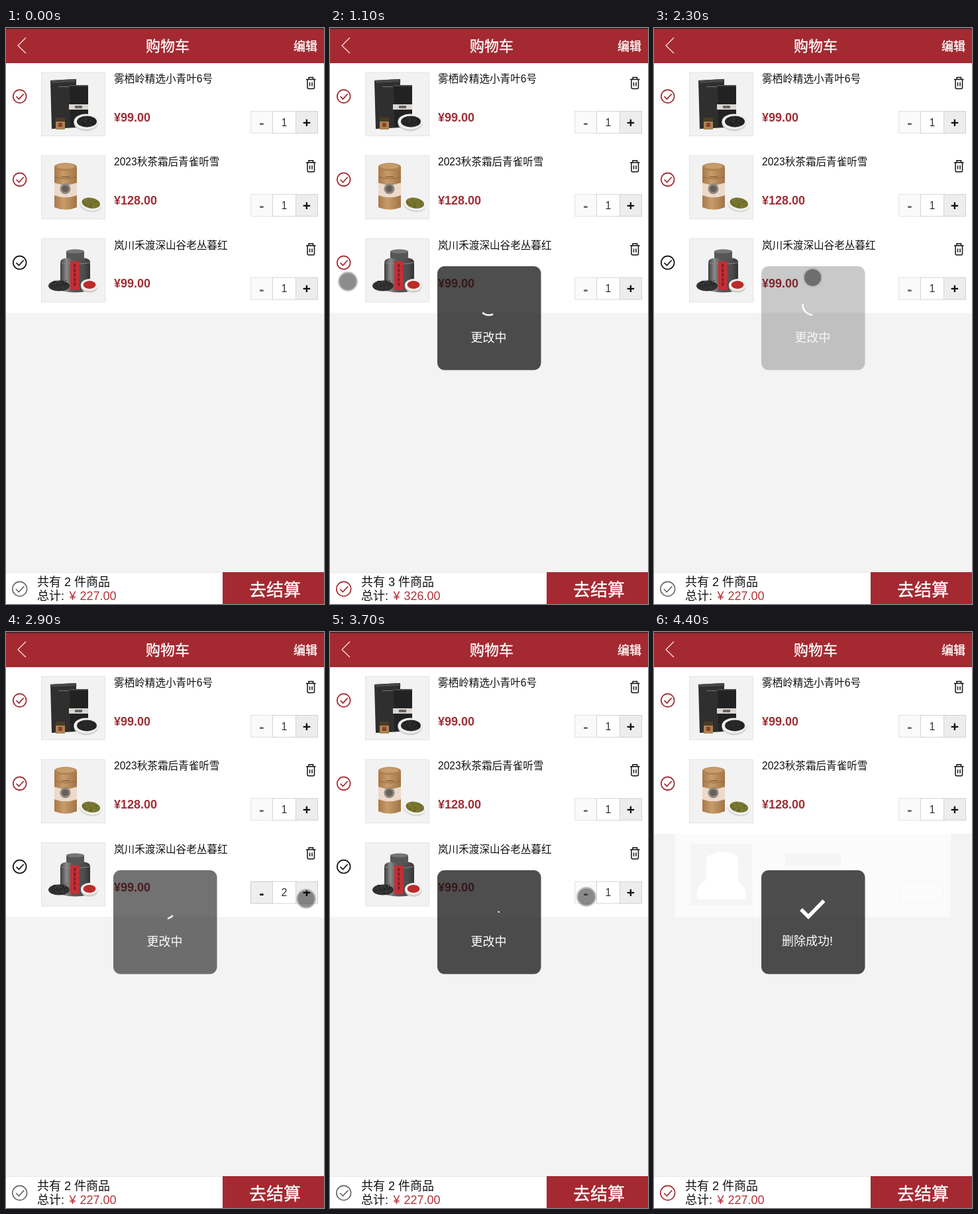
Recreate the animation shown at these times as an HTML page. Size 480 px wide and 868 px high, loop 4.5 s.

```html
<!DOCTYPE html>
<html lang="zh-CN">
<head>
<meta charset="utf-8">
<title>购物车</title>
<style>
  html, body { margin: 0; width: 100%; height: 100%; overflow: hidden; background: #f3f3f3; }
  svg { display: block; width: 480px; height: 868px; font-family: "Liberation Sans", "Noto Sans CJK SC", "Noto Sans CJK", sans-serif; }
</style>
</head>
<body>
<svg viewBox="0 0 480 868">
  <defs>
    <linearGradient id="tin">
      <stop offset="0" stop-color="#3a3a3a"/><stop offset=".2" stop-color="#8a8a8a"/>
      <stop offset=".4" stop-color="#5a5a5a"/><stop offset=".8" stop-color="#4c4c4c"/>
      <stop offset="1" stop-color="#333"/>
    </linearGradient>
    <linearGradient id="can">
      <stop offset="0" stop-color="#a97848"/><stop offset=".4" stop-color="#c89c6a"/>
      <stop offset="1" stop-color="#a27446"/>
    </linearGradient>
  </defs>
  <g id="stage"></g>
</svg>
<script>
const LOOP = 4500, STEP = 100, PITCH = 125.3, RED = '#a42931';
const stage = document.getElementById('stage');

const rect = (x, y, w, h, fill, more = '') =>
  `<rect x="${x}" y="${y}" width="${w}" height="${h}" fill="${fill}" ${more}/>`;
const oval = (x, y, rx, ry, fill, more = '') =>
  `<ellipse cx="${x}" cy="${y}" rx="${rx}" ry="${ry}" fill="${fill}" ${more}/>`;
const line = (d, color, width, more = '') =>
  `<path d="${d}" fill="none" stroke="${color}" stroke-width="${width}" ${more}/>`;
const text = (x, y, size, fill, str, more = '') =>
  `<text x="${x}" y="${y}" font-size="${size}" fill="${fill}" ${more}>${str}</text>`;
const MID = 'text-anchor="middle"', BOLD = 'font-weight="bold"';
const FIRM = 'stroke="#fff" stroke-width=".35"';

const tick = (x, y, r, color, width) =>
  `<circle cx="${x}" cy="${y}" r="${r}" fill="none" stroke="${color}" stroke-width="${width}"/>` +
  line(`M${x - r * .52} ${y + r * .02}l${r * .4} ${r * .4}l${r * .72} ${-r * .78}`, color, width);

// Loose tea: short seeded strokes inside an ellipse
function leaves(x, y, rx, ry, colors, seed) {
  const rnd = () => (seed = seed * 16807 % 2147483647) / 2147483647;
  let out = '';
  for (let i = 0; i < 36; i++) {
    const a = rnd() * 6.283, d = Math.sqrt(rnd());
    out += line(`M${(x + rx * d * Math.cos(a)).toFixed(1)} ${(y + ry * d * Math.sin(a)).toFixed(1)}` +
      `l${(rnd() * 5 - 2.5).toFixed(1)} ${(rnd() * 3 - 1.5).toFixed(1)}`, colors[i % colors.length], 1.3);
  }
  return out;
}

const boxes =
  '<path d="M67 79L106 77V150L69 152Z" fill="#2f2f2f"/>' +
  '<path d="M67 79L102 77L107 81L70 83Z" fill="#484848"/>' + rect(79, 88, 16, 1, '#777') +
  '<path d="M96 87H124V147L97 149Z" fill="#222"/>' + rect(96, 86, 28, 2, '#484848') +
  rect(95, 115, 29, 8, '#d9d6d2') + rect(104, 117, 11, 4, '#6b6460') +
  rect(75, 135, 14, 18, '#a98555') + rect(75, 135, 14, 6, '#4b3c28') + rect(79, 143, 6, 6, '#8f3d2c') +
  oval(121, 143, 18.5, 12.5, '#d2d2d2') + oval(121, 141, 18.5, 11.5, '#efefef') +
  oval(122, 141, 15, 8.5, '#262626') + leaves(122, 141, 13, 7, ['#111', '#444', '#2a2a2a'], 7);

const canister =
  '<path d="M73 84V145Q90 152 107 145V84Z" fill="url(#can)"/>' +
  '<path d="M73 108Q90 114 107 108V127Q90 133 73 127Z" fill="#ecd9ca"/>' +
  oval(90, 84, 17, 6, '#b08050') + oval(90, 83, 14, 4, '#c79c6c') +
  line('M73 99Q90 105 107 99', '#8f673f', 1) + line('M84 99h12', '#7a5836', 1.2) +
  oval(89.5, 117, 8, 8, '#8d8780') + oval(89.5, 117, 5, 5, '#655f58') +
  '<g transform="rotate(10 128 140)">' + oval(128, 141, 17, 11, '#d6d6d6') + oval(128, 139, 17, 10.5, '#f4f4f4') +
  oval(128, 138.5, 14, 8, '#77752f') + leaves(128, 138.5, 12, 6.5, ['#59611f', '#8d8a42', '#6b5a25'], 21) + '</g>';

const tin =
  '<path d="M82 102Q83 97 92 96H118Q126 97 127 102V145Q104 151 82 145Z" fill="url(#tin)"/>' +
  '<path d="M91 86Q105 81 118 86V96Q105 100 91 96Z" fill="#565656"/>' +
  oval(104.5, 86, 13.5, 3, '#757575') + line('M82 103Q104 107 127 103', '#8a8a8a', 1) +
  rect(97, 101, 13.5, 43, '#c42f35') + line('M103.7 105V140', '#7d1f24', 3, 'stroke-dasharray="5 2"') +
  oval(80, 138, 16, 8, '#303030') + leaves(80, 136, 14, 8, ['#151515', '#4a4a4a', '#2b2725'], 33) +
  oval(126, 138.5, 13, 10, '#d2cdc9') + oval(126, 136.5, 13, 9, '#f2eeeb') + oval(126, 136.5, 9.5, 6, '#bd2b2b');

const items = [
  { name: '雾栖岭精选小青叶6号', price: '99.00', art: boxes },
  { name: '2023秋茶霜后青雀听雪', price: '128.00', art: canister },
  { name: '岚川禾渡深山谷老丛暮红', price: '99.00', art: tin }
];

const bin = line('M453 77.5H467.5M457 77V74.5H463.5V77M455 78V89.5Q455 91.5 457 91.5H463.5Q465.5 91.5 465.5 89.5V78M458.5 82V87.5M462 82V87.5', '#111', 1.5);

function row(item, index, checked, count) {
  const less = count > 1;
  return `<g transform="translate(0 ${index * PITCH})">` +
    rect(0, 53, 480, PITCH + .4, '#fff') +
    tick(20.7, 103, 9.9, checked ? RED : '#111', 1.7) +
    rect(53.5, 67, 96, 95.5, '#f2f2f2', 'stroke="#e4e4e4"') + item.art +
    text(163, 82, 15.6, '#111', item.name) +
    text(163, 140.5, 18, '#9e2f36', '¥' + item.price, BOLD) + bin +
    rect(369.5, 125.5, 33, 33, less ? '#eee' : '#fafafa', `stroke="${less ? '#ccc' : '#e2e2e2'}"`) +
    rect(437.5, 125.5, 33, 33, '#ededed', 'stroke="#d0d0d0"') +
    rect(402.5, 125.5, 35, 33, '#fff', 'stroke="#d4d4d4"') +
    text(386, 150, 22, less ? '#111' : '#666', '-', MID + ' ' + BOLD) +
    text(420, 147.5, 16, '#333', count, MID) +
    text(454, 149.5, 21, '#111', '+', MID + ' ' + BOLD) + '</g>';
}

const header = rect(0, 0, 480, 53, RED) + rect(0, 0, 480, 1.5, '#3c2226') +
  line('M30 14.5L18 26.5L30 38', '#f3dfe0', 1.3) +
  text(244, 34.5, 22, '#fff', '购物车', MID + ' ' + FIRM) + text(434, 34, 18, '#fff', '编辑', FIRM);

const footer = (count, total, all) =>
  rect(0, 820, 480, 48, '#fff') + rect(0, 820, 327, 1, '#e8e8e8') +
  tick(20.7, 845.3, 10.9, all ? RED : '#666', 1.6) +
  text(47, 841, 18, '#111', `共有 ${count} 件商品`) + text(47, 862, 18, '#111', '总计:') +
  text(95.5, 862, 18, '#b0333b', '¥') + text(111.5, 862, 18, '#b0333b', total) +
  rect(327, 820, 153, 48, RED) + text(406, 855.5, 26, '#fff', '去结算', MID + ' ' + FIRM);

// Each loading toast follows a tap: check, uncheck, add one, take one away
const CHECK = 900, UNCHECK = 2000, ADD = 2800, TAKE = 3700, ASK = 4200, DELETE = 4400;
const toasts = [[CHECK, 500], [UNCHECK, 400], [ADD, 300], [TAKE, 300]];

const panel = rect(162, 359, 156.5, 156.5, '#111', 'rx="11" fill-opacity=".74"');

// The toast appears at once and fades in its last two steps; its spinner turns and grows with age
function loading(t) {
  const toast = toasts.find(([from, span]) => t >= from && t < from + span);
  if (!toast) return '';
  const age = (t - toast[0]) / STEP, left = toast[1] / STEP - age;
  const angle = 18 + 40 * age, half = 3.5 + 14 * age;
  const point = a => `${240 + 15.5 * Math.cos(a * Math.PI / 180)} ${417 + 15.5 * Math.sin(a * Math.PI / 180)}`;
  return `<g opacity="${Math.min(1, left / 2 - .2)}">${panel}` +
    line(`M${point(angle - half)}A15.5 15.5 0 0 1 ${point(angle + half)}`, '#eee', 2.8) +
    text(239.5, 473, 18, '#fff', '更改中', MID) + '</g>';
}

const success = panel + line('M222 418L233 429L256.5 405', '#fff', 5.5) + text(193, 472, 18, '#fff', '删除成功!');

const dialog = rect(0, 0, 480, 868, '#000', 'fill-opacity=".55"') +
  rect(32, 304, 416, 260, '#fff', 'rx="15"') +
  text(240, 351, 21, '#111', '删除商品', MID + ' ' + BOLD) +
  text(240, 428, 20, '#777', '确认删除该商品吗?', MID) +
  line('M32 491.5H448M240.5 491.5V564', '#e5e5e5', 1) +
  text(136, 535, 22, '#111', '取消', MID + ' ' + BOLD) + text(344, 535, 22, '#576b95', '确定', MID + ' ' + BOLD);

// Pale remains of the removed row
const leaving = rect(32, 304, 416, 125.4, '#fbfbfb') + rect(54, 319, 94, 93, '#f5f5f5') +
  '<path d="M79 340Q104 322 127 340V375Q140 384 138 403H65Q62 382 79 374Z" fill="#fff"/>' +
  rect(198, 334, 84, 19, '#f5f5f5') + rect(370.5, 375.5, 66, 33, 'none', 'stroke="#f6f6f6"');

// Pointer path: time, x, y
const path = [
  [400, 90, 470], [700, 17, 355], [900, 17, 355], [1100, 27, 382],
  [1500, 14, 349], [2000, 14, 349], [2600, 465, 403], [2900, 453, 402], [3000, 453, 402],
  [3500, 387, 399], [3700, 387, 399], [4100, 450.5, 349], [4200, 450.5, 349], [4300, 352, 480]
];

function pointer(t) {
  const next = path.findIndex(p => p[0] >= t);
  if (next < 0 || t < path[0][0]) return '';
  const b = path[next], a = path[Math.max(0, next - 1)];
  const k = b === a ? 1 : (t - a[0]) / (b[0] - a[0]);
  const ease = k * k * (3 - 2 * k);
  return oval(a[1] + (b[1] - a[1]) * ease, a[2] + (b[2] - a[2]) * ease, 13.8, 13.8, '#000',
    'fill-opacity=".45" stroke="#bbb" stroke-opacity=".85" stroke-width="2.4"');
}

function draw(t) {
  const deleted = t >= DELETE;
  const third = t >= CHECK && t < UNCHECK;
  const doubled = t >= ADD && t < TAKE;
  const rows = items.slice(0, deleted ? 2 : 3)
    .map((item, i) => row(item, i, i < 2 || third, i === 2 && doubled ? 2 : 1)).join('');
  stage.innerHTML = rect(0, 0, 480, 868, '#f3f3f3') + rows + (deleted ? leaving : '') + header +
    footer(third ? 3 : 2, third ? '326.00' : '227.00', third || deleted) +
    loading(t) + (deleted ? success : t >= ASK ? dialog : '') + pointer(t);
}

const start = performance.now();
let shown = -1;
function frame() {
  const t = Math.floor((performance.now() - start) % LOOP / STEP) * STEP;
  if (t !== shown) draw(shown = t);
  requestAnimationFrame(frame);
}
frame();
</script>
</body>
</html>
```
